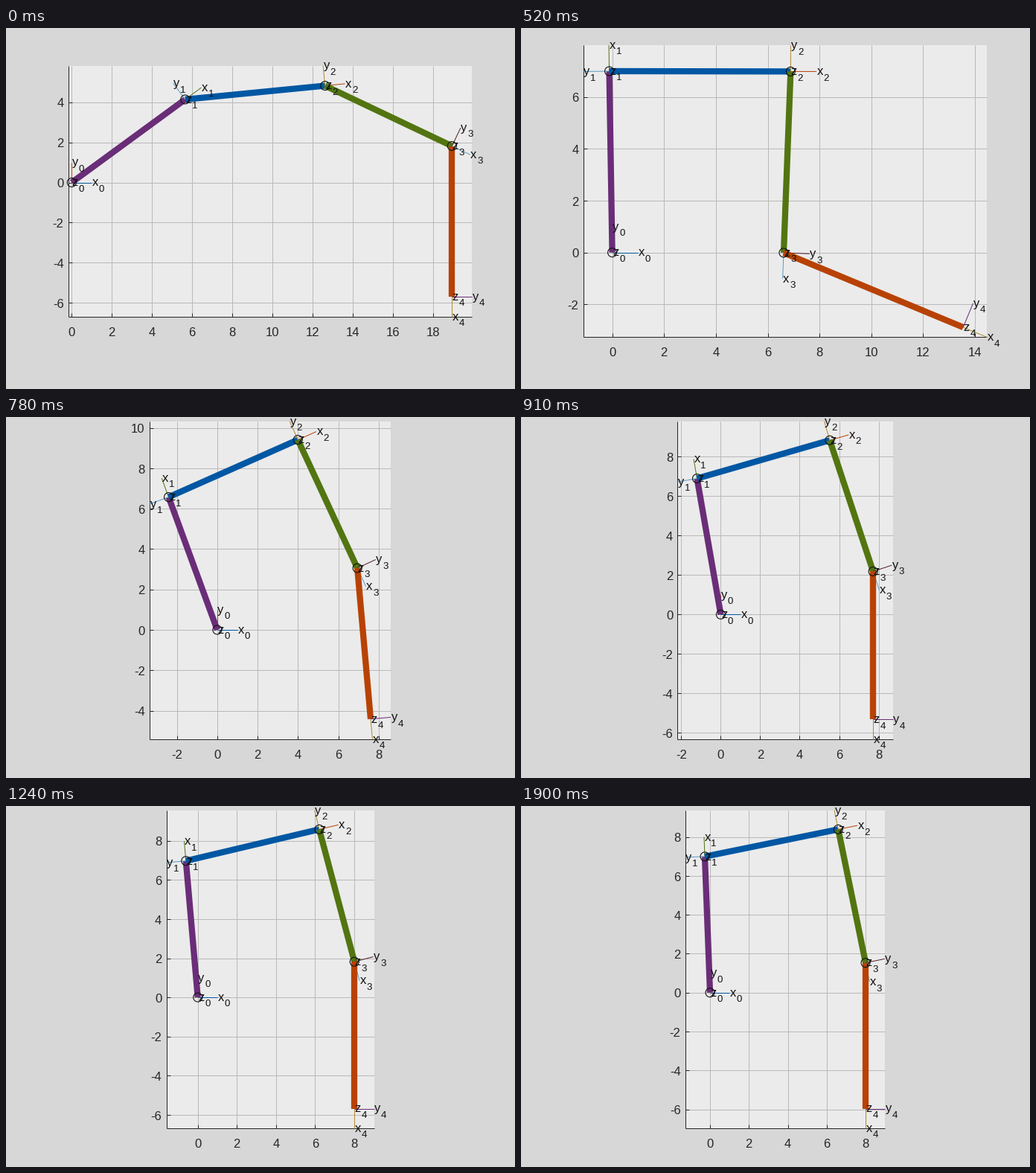
Write a matplotlib script that moves like this. It is 684 by 485 pixels and loops after 2160 ms.

```python
import math

import matplotlib.pyplot as plt
import numpy as np
from matplotlib.animation import ArtistAnimation
from matplotlib.collections import LineCollection
from matplotlib.patches import Circle, Rectangle

W, H, DPI = 684, 485, 64
PT = 72 / DPI                      # points per pixel
TICK_MS = 10

BOX_W, BOX_H = 542.5, 427          # largest plot area
MID = (355.05, 219.3)              # its centre
LENGTHS = (7, 7, 7, 7.5)
BASE_MARGIN = 0.167

BACK, PANEL, GRID, INK = "#d7d7d7", "#ebebeb", "#b9b9b9", "#262626"
BLUE, ORANGE, YELLOW, PURPLE = "#0057a3", "#b84205", "#b08a30", "#6a2d78"
GREEN, CYAN, RED = "#527511", "#5b9cc4", "#522026"

LINKS = (PURPLE, BLUE, GREEN, ORANGE)
X_COLORS = (BLUE, GREEN, ORANGE, CYAN, YELLOW)
Y_COLORS = (ORANGE, CYAN, YELLOW, RED, PURPLE)

# Absolute link angles in degrees at the key poses
POSES = np.array([
    (36.2, 5.6, -25.4, -90),
    (90.94, -0.1, -92.2, -22.55),
    (133.94, 42.2, -49.8, -73.2),
    (99.9, 16.05, -71.7, -90),
    (94.97, 13.3, -75.1, -90),
    (92.8, 11.9, -77.7, -90),
    (92.2, 11.5, -78.4, -90),
])

# (duration in ms, position along the key poses)
STEPS = [
    (130, 0), (130, 0.25), (130, 0.5), (130, 0.75), (130, 1), (130, 2),
    (130, 2.7), (200, 3), (130, 3.62), (260, 4), (200, 5), (200, 5.65),
    (260, 6),
]

fig = plt.figure(figsize=(W / DPI, H / DPI), dpi=DPI, facecolor=BACK)
ax = fig.add_axes([0, 0, 1, 1])
ax.set_xlim(0, W)
ax.set_ylim(H, 0)
ax.axis("off")


def angles_at(pos):
    keys = np.arange(len(POSES))
    return [np.interp(pos, keys, column) for column in POSES.T]


def unit(deg):
    return np.array([math.cos(math.radians(deg)), math.sin(math.radians(deg))])


def text(x, y, label, size=16.67, ha="left", color="#111111"):
    return ax.text(x, y, label, fontsize=size * PT, ha=ha, va="baseline",
                   family="Liberation Sans", color=color, zorder=20)


def axis_label(point, letter, index):
    x, y = point
    width = 16.67 * 0.5
    return [text(x + 0.5, y + 4.8, letter),
            text(x + width + 1.1, y + 12.3, str(index), 13.3)]


def segment(a, b, color, width, z):
    line, = ax.plot([a[0], b[0]], [a[1], b[1]], color=color, lw=width * PT,
                    solid_capstyle="butt", zorder=z)
    return line


def segments(lines, color, z):
    return ax.add_collection(
        LineCollection(lines, colors=color, linewidths=PT, zorder=z))


def ticks(lo, hi):
    return range(2 * math.ceil(lo / 2), 2 * math.floor(hi / 2) + 1, 2)


def draw_plot_area(lo, hi, to_px):
    left, bottom = to_px(lo)
    right, top = to_px(hi)
    panel = ax.add_patch(Rectangle((left, top), right - left, bottom - top,
                                   facecolor=PANEL, lw=0, zorder=1))
    grid, marks, labels = [], [], []
    for value in ticks(lo[0], hi[0]):
        x = to_px((value, 0))[0]
        grid.append([(x, top), (x, bottom)])
        marks.append([(x, bottom), (x, bottom - 5)])
        labels.append(text(x, bottom + 26, str(value), ha="center",
                           color=INK))
    for value in ticks(lo[1], hi[1]):
        y = to_px((0, value))[1]
        grid.append([(left, y), (right, y)])
        marks.append([(left, y), (left + 5, y)])
        labels.append(text(left - 6.3, y + 6.7, str(value), ha="right",
                           color=INK))
    marks += [[(left, top), (left, bottom)], [(left, bottom), (right, bottom)]]
    return [panel, segments(grid, GRID, 2), segments(marks, INK, 3)] + labels


def draw_arm(angles):
    joints = [np.zeros(2)]
    for angle, length in zip(angles, LENGTHS):
        joints.append(joints[-1] + length * unit(angle))
    headings = [0, *angles]
    x_tips = [p + unit(h) for p, h in zip(joints, headings)]
    y_tips = [p + unit(h + 90) for p, h in zip(joints, headings)]

    # Tight limits with equal scale, centred in the available area
    points = np.array(joints + x_tips + y_tips)
    lo, hi = points.min(axis=0), points.max(axis=0)
    lo[0] = min(lo[0], -BASE_MARGIN)
    span = hi - lo
    scale = min(BOX_W / span[0], BOX_H / span[1])
    centre = (lo + hi) / 2

    def to_px(p):
        return (MID[0] + (p[0] - centre[0]) * scale,
                MID[1] - (p[1] - centre[1]) * scale)

    artists = draw_plot_area(lo, hi, to_px)
    px = [to_px(p) for p in joints]
    for i, origin in enumerate(px):
        x_tip, y_tip = to_px(x_tips[i]), to_px(y_tips[i])
        z = 5 + 2 * i
        artists += [segment(origin, x_tip, X_COLORS[i], 1, z),
                    segment(origin, y_tip, Y_COLORS[i], 1, z)]
        artists += axis_label(x_tip, "x", i)
        artists += axis_label(y_tip, "y", i)
        artists += axis_label(origin, "z", i)
        if i < len(LINKS):
            artists.append(segment(origin, px[i + 1], LINKS[i], 8.3, z + 1))
            artists.append(ax.add_patch(
                Circle(origin, 6, fill=False, ec="#111111", lw=1.1 * PT,
                       zorder=18)))
    return artists


frames = []
for duration, pos in STEPS:
    frames += [draw_arm(angles_at(pos))] * (duration // TICK_MS)

anim = ArtistAnimation(fig, frames, interval=TICK_MS, repeat=True,
                       repeat_delay=0, blit=False)
plt.show()
```
